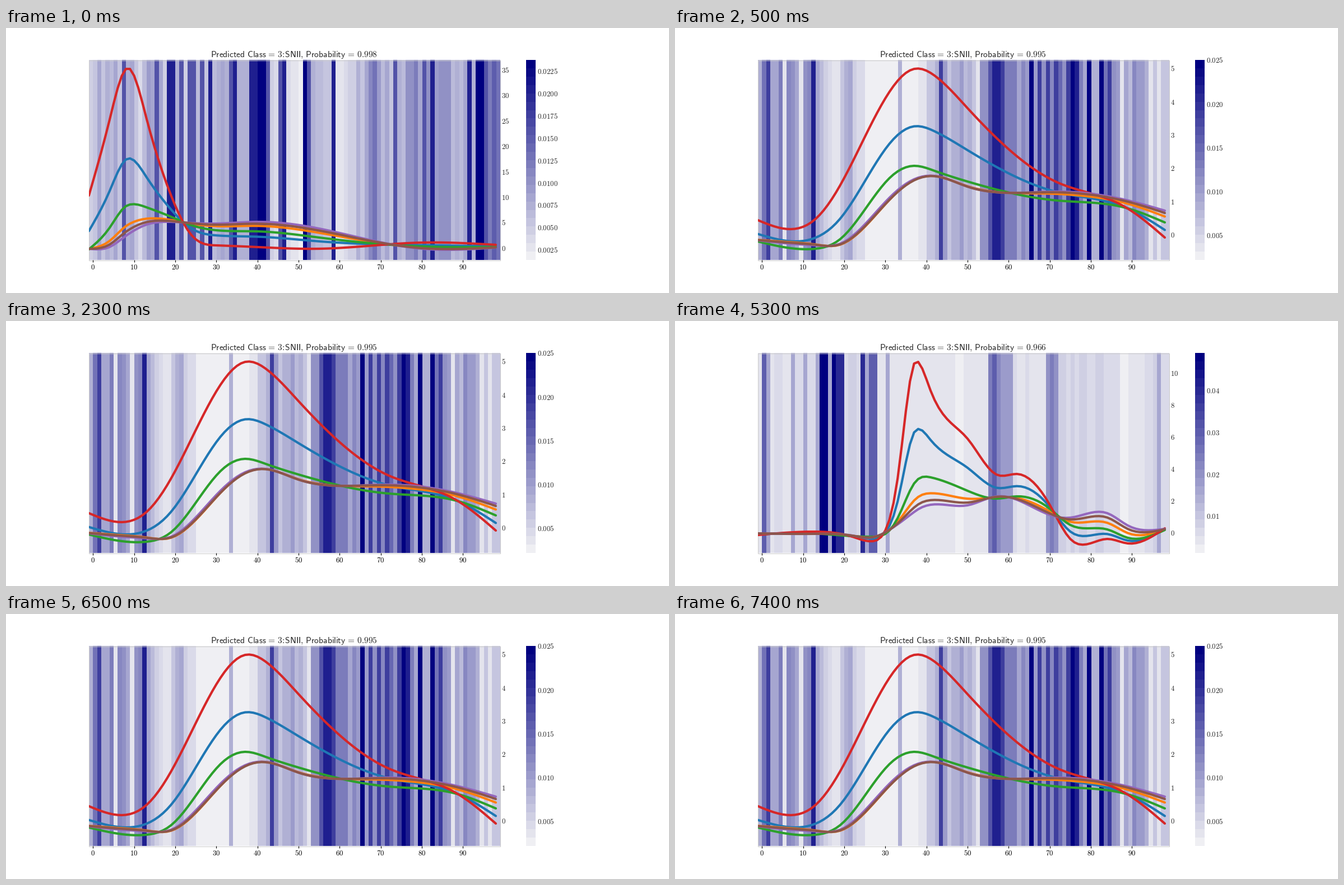
Write a matplotlib script that moves like this. It is 1183 px wide and 473 px high and loops after 8000 ms.

```python
import numpy as np
import matplotlib.pyplot as plt
from matplotlib.animation import FuncAnimation
from matplotlib.colors import LinearSegmentedColormap
from matplotlib.patches import Rectangle

plt.rcParams["mathtext.fontset"] = "cm"

# Stage and panel geometry in pixels, y pointing down
W, H, DPI = 1183, 473, 100
LEFT, RIGHT, TOP, BOTTOM = 147.9, 881.3, 57, 413.9
BAR_LEFT, BAR_RIGHT = 928, 944.5
COLUMNS = 100
COLUMN_WIDTH = (RIGHT - LEFT) / COLUMNS
STEPS = np.arange(-1, 99)
INK = "0.15"
CMAP = LinearSegmentedColormap.from_list("navy_fade", ["#efeff3", "#000080"], N=24)

fig = plt.figure(figsize=(W / DPI, H / DPI), dpi=DPI, facecolor="white")
ax = fig.add_axes([0, 0, 1, 1])


def to_px(step):
    return LEFT + (np.asarray(step) + 1) * COLUMN_WIDTH


def spline(knots, values, x):
    """Natural cubic spline."""
    k, v = np.array(knots, float), np.array(values, float)
    h, n = np.diff(k), len(k)
    system, rhs = np.eye(n), np.zeros(n)
    for i in range(1, n - 1):
        system[i, i - 1:i + 2] = h[i - 1], 2 * (h[i - 1] + h[i]), h[i]
        rhs[i] = 6 * ((v[i + 1] - v[i]) / h[i] - (v[i] - v[i - 1]) / h[i - 1])
    bend = np.linalg.solve(system, rhs)
    i = np.clip(np.searchsorted(k, x, side="right") - 1, 0, n - 2)
    a, b = (k[i + 1] - x) / h[i], (x - k[i]) / h[i]
    return (a * v[i] + b * v[i + 1]
            + ((a**3 - a) * bend[i] + (b**3 - b) * bend[i + 1]) * h[i]**2 / 6)


def light_curves(knots, red, green, purple, blue, orange, brown):
    """Three key curves; the other bands drift between their neighbours."""
    red, green, purple = (spline(knots, key, STEPS) for key in (red, green, purple))

    def between(start, end, drift):
        return start + (end - start) * np.linspace(*drift, len(STEPS))

    return dict(blue=between(red, green, blue), orange=between(green, purple, orange),
                green=green, red=red, purple=purple, brown=between(green, purple, brown))


def attention(seed, trend, bars):
    """Jittered trend with a few marked columns, in percent of the colour range."""
    jitter = np.random.default_rng(seed).uniform(0.65, 1.35, COLUMNS)
    levels = jitter * np.interp(range(COLUMNS), list(trend), list(trend.values()))
    for level, columns in bars.items():
        levels[columns] = level
    return levels


def label(x, y, text, style="mathrm", size=9.2, color=INK, ha="left"):
    return ax.text(x, y, rf"$\{style}{{{text}}}$", fontsize=size, color=color,
                   ha=ha, va="baseline")


def scale_labels(x, texts, y0, dy):
    return [label(x, y0 - dy * i + 4.3, text) for i, text in enumerate(texts)]


def build_scene(probability, stripes, curves, axis, bar):
    title = r"Predicted\ Class\,=\,3\!:\!SNII,\,Probability\,=\," + probability
    artists = [label((LEFT + RIGHT) / 2 - 0.8, 51.5, title, "mathsf", 11.1, ha="center")]
    artists.append(ax.imshow([stripes], cmap=CMAP, vmin=0, vmax=100, aspect="auto",
                             interpolation="nearest", zorder=1,
                             extent=(LEFT, RIGHT, BOTTOM, TOP)))
    for name, heights in curves.items():
        line, = ax.plot(to_px(STEPS), heights, color="tab:" + name, lw=3,
                        solid_capstyle="round", zorder=3)
        line.set_clip_path(frame_box)
        artists.append(line)
    return artists + scale_labels(884, *axis) + scale_labels(948, *bar)


frame_box = ax.add_patch(Rectangle((LEFT + 0.6, TOP + 0.6), RIGHT - LEFT, BOTTOM - TOP,
                                   fill=False, ec="0.8", lw=0.75, zorder=2))
ax.imshow(np.linspace(100, 0, 357)[:, None], cmap=CMAP, vmin=0, vmax=100, aspect="auto",
          interpolation="nearest", extent=(BAR_LEFT, BAR_RIGHT, BOTTOM, TOP))
for tick in range(0, 100, 10):
    x = to_px(tick)
    ax.plot([x, x], [BOTTOM + 0.5, BOTTOM + 4.5], color="black", lw=0.8,
            solid_capstyle="butt")
    label(x, 431.3, tick, "mathsf", color="black", ha="center")

fast = build_scene(
    "0.998",
    attention(4, {0: 12, 3: 27, 10: 25, 12: 10, 15: 35, 18: 18, 38: 26, 45: 12, 51: 6,
                  55: 27, 61: 4, 66: 28, 70: 44, 73: 18, 80: 46, 90: 30, 99: 48},
              {100: [41, 42, 52, 94, 95],
               86: [19, 20, 29, 35, 39, 40, 47, 59, 83, 92],
               65: [8, 16, 22, 24, 25, 27, 34, 43, 46, 53, 74, 81, 96]}),
    light_curves(
        [-1, 4, 8, 9, 13, 19, 24, 30, 40, 55, 80, 98],
        red=[299, 165, 73, 73, 161, 299, 370, 388, 391, 394, 383, 387],
        green=[395, 357, 318, 315, 320, 337, 352, 361, 363, 374, 390, 391],
        purple=[394, 391, 371, 366, 351, 346, 348, 349, 346, 358, 394, 392],
        blue=(0.66, 0.66), orange=(0.7, 0.4), brown=(0.88, 0.7)),
    axis=(range(0, 40, 5), 393.5, 45.43),
    bar=([f"{0.0025 * n:.4f}" for n in range(1, 10)], 396.8, 39.86))

slow = build_scene(
    "0.995",
    attention(7, {0: 42, 9: 32, 12: 55, 16: 10, 19: 5, 21: 38, 26: 2, 38: 2, 45: 29,
                  52: 25, 55: 55, 62: 42, 73: 52, 79: 44, 88: 38, 99: 28},
              {100: [66, 76, 80, 83],
               85: [13, 57, 58, 77],
               73: [2, 44, 59, 68, 70, 72, 75, 85],
               25: [0, 34, 81, 82],
               8: [6, 10, 53, 88, 95, 97]}),
    light_curves(
        [-1, 7, 13, 19, 31, 37, 42, 50, 72, 88, 98],
        red=[343, 359, 341, 281, 114, 73, 85, 143, 276, 318, 374],
        green=[381, 393, 394, 377, 268, 246, 255, 274, 308, 320, 347],
        purple=[379, 385, 388, 385, 303, 270, 264, 283, 292, 306, 326],
        blue=(0.65, 0.5), orange=(1.4, 0.5), brown=(1.25, 0.8)),
    axis=(range(6), 369.5, 59.3),
    bar=([f"{0.005 * n:.3f}" for n in range(1, 6)], 371, 78.25))

late = build_scene(
    "0.966",
    attention(2, {0: 9, 28: 12, 32: 5, 55: 6, 56: 46, 61: 46, 62: 10, 69: 6, 70: 40,
                  72: 33, 73: 12, 86: 13, 88: 4, 92: 5, 94: 13, 99: 12},
              {100: [15, 16, 18],
               82: [19, 20, 25],
               60: [1, 27, 28, 57],
               30: [2, 8, 11, 14, 17, 26, 31, 97]}),
    light_curves(
        [-1, 12, 22, 27, 30, 33, 37, 38, 41, 50, 57, 62, 70, 75, 84, 89, 98],
        red=[382, 376, 385, 393, 374, 281, 76, 73, 124, 210, 274, 273, 328, 389, 389,
             397, 370],
        green=[381, 379, 384, 385, 380, 352, 290, 282, 279, 303, 317, 313, 335, 364, 372,
               387, 373],
        purple=[379, 380, 383, 386, 377, 363, 341, 336, 328, 329, 313, 319, 346, 351, 343,
                365, 371],
        blue=(0.62, 0.5), orange=(0.75, 0.35), brown=(0.93, 0.7)),
    axis=(range(0, 12, 2), 378.5, 56.9),
    bar=([f"{0.01 * n:.2f}" for n in range(1, 5)], 349, 74.7))

ax.set(xlim=(0, W), ylim=(H, 0))
ax.axis("off")

# One entry per half second
schedule = [fast] + [slow] * 6 + [late] * 6 + [slow] * 3


def update(frame):
    for scene in (fast, slow, late):
        for artist in scene:
            artist.set_visible(scene is schedule[frame])
    return []


anim = FuncAnimation(fig, update, frames=len(schedule), interval=500, repeat=True,
                     repeat_delay=0, blit=False)
plt.show()
```
